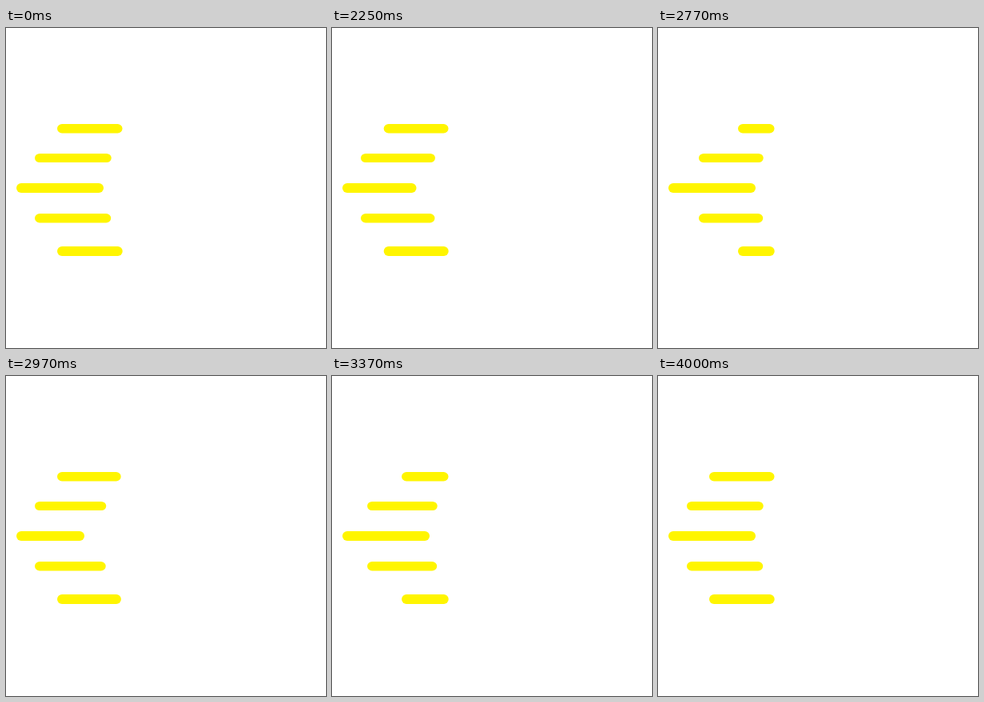
Recreate the animation shown at these times as an HTML page. Size 400x400 px, loop 4.02 s.

```html
<!DOCTYPE html>
<html lang="en">
<head>
<meta charset="utf-8">
<title>Speed lines</title>
<style>
  html, body { margin: 0; width: 100%; height: 100%; overflow: hidden; background: #fff; }
  svg { display: block; width: 100vw; height: 100vh; }
  rect { fill: #fff500; }
</style>
</head>
<body>
<svg viewBox="0 0 400 400"></svg>
<script>
const LOOP = 4020, HOLD = 2020, STEP = 25;
const SWEEP = 20, TURN = 24.2, LAST = 80;

// Sweep positions and the part of each line cut off there, in pixels:
// positive cuts the left side, negative cuts the right side.
const stops = [0, 0.2, 5.2, 6.8, 12, 14.4, 16.8, 18.2, SWEEP];
const outer = [84, 82, 41, 36, 8, 0, -11, -14, -20];
const inner = [74, 72, 19, 15, 0, -3, -24, -53, -85];
const middle = [67, 65, 1, 0, 0, -18, -54, -82, -109];

const lines = [
  { left: 64, right: 145.5, top: 120, height: 11.5, cuts: outer },
  { left: 36, right: 131.7, top: 157, height: 11, cuts: inner },
  { left: 13, right: 122, top: 194, height: 12, cuts: middle },
  { left: 36, right: 131.2, top: 232, height: 11.5, cuts: inner },
  { left: 64, right: 145.7, top: 273, height: 12, cuts: outer }
];

const svg = document.querySelector('svg');
for (const line of lines) {
  line.rect = document.createElementNS('http://www.w3.org/2000/svg', 'rect');
  line.rect.setAttribute('y', line.top);
  line.rect.setAttribute('height', line.height);
  line.rect.setAttribute('rx', 6);
  line.rect.setAttribute('ry', line.height / 2);
  svg.append(line.rect);
}

function tickAt(time) {
  if (time < HOLD) return 0;
  return 1 + Math.floor(Math.floor((time - HOLD) / 10) * 10 / STEP);
}

// Back and forth between 0 and SWEEP.
function sweepAt(tick) {
  const span = 2 * SWEEP;
  const p = ((tick - TURN) % span + span) % span;
  return p < SWEEP ? p : span - p;
}

function cutAt(cuts, pos) {
  let i = 1;
  while (i < stops.length - 1 && pos > stops[i]) i++;
  const f = (pos - stops[i - 1]) / (stops[i] - stops[i - 1]);
  return cuts[i - 1] + (cuts[i] - cuts[i - 1]) * f;
}

function draw(time) {
  const tick = tickAt(time);
  const resting = tick === 0 || tick >= LAST;
  const pos = sweepAt(tick);
  for (const { left, right, cuts, rect } of lines) {
    const cut = resting ? 0 : cutAt(cuts, pos);
    const x = left + Math.max(cut, 0);
    const width = right + Math.min(cut, 0) - x;
    rect.setAttribute('x', x.toFixed(2));
    rect.setAttribute('width', width < 1 ? 0 : width.toFixed(2));
  }
}

const start = performance.now();
function loop() {
  draw((performance.now() - start) % LOOP);
  requestAnimationFrame(loop);
}
loop();
</script>
</body>
</html>
```
